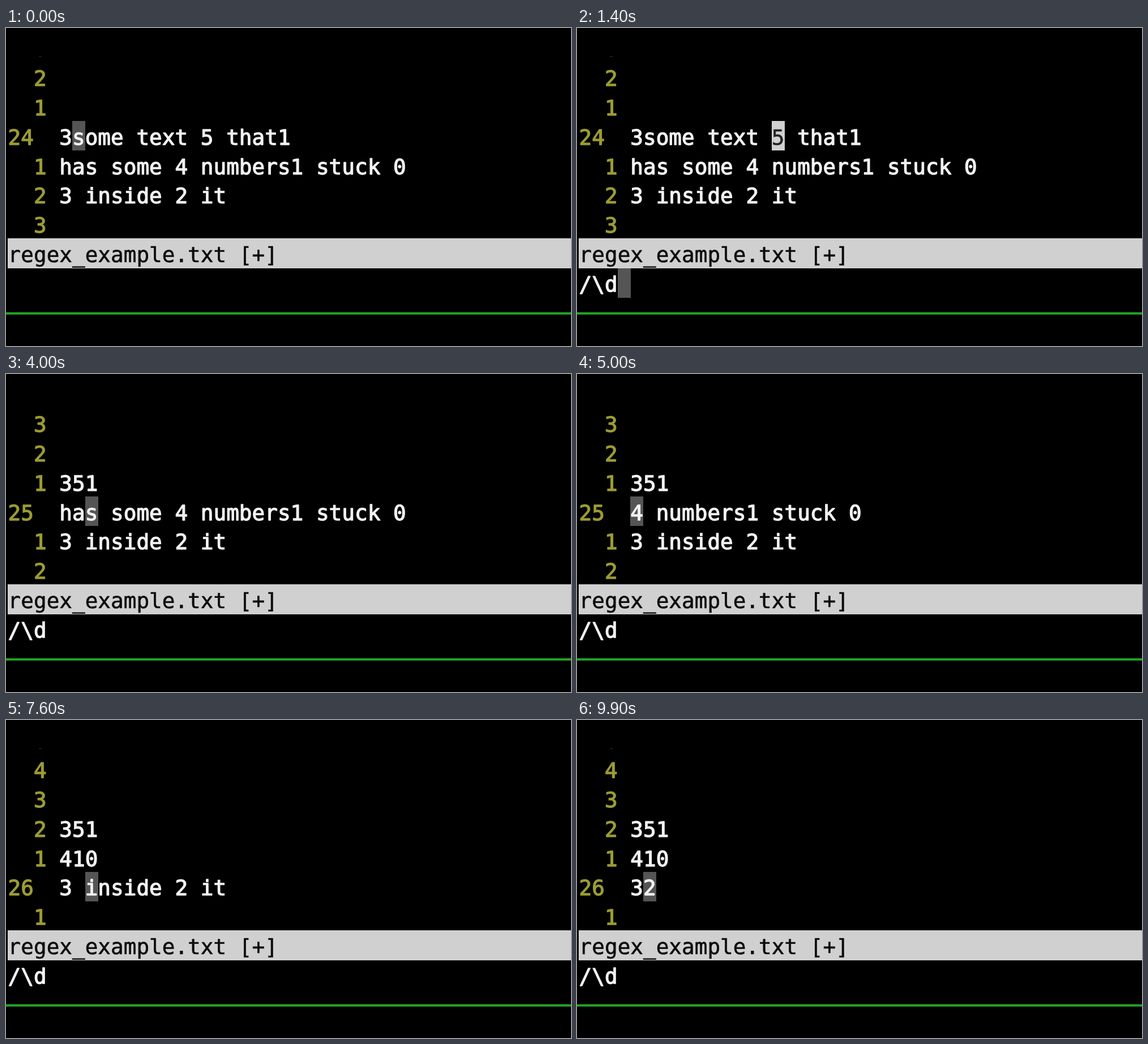
Animation, 998 px wide and 561 px high, one loop 10000 ms. Source, as an HTML page with a canvas:

```html
<!DOCTYPE html>
<html lang="en">
<head>
<meta charset="utf-8">
<title>Deleting up to the next digit</title>
<style>
  html, body { margin: 0; width: 100%; height: 100%; overflow: hidden; background: #000; }
  canvas { display: block; }
</style>
</head>
<body>
<canvas id="screen" width="998" height="561"></canvas>
<script>
const ctx = document.getElementById('screen').getContext('2d');
const LOOP = 10000;
const LEFT = 3.6, TOP = 8.3, CELL = 22.68, ROW = 51.9, BASELINE = 41.6;
const TEXT_COL = 4, TEXT_ROW = 3, STATUS_ROW = 7, COMMAND_ROW = 8;
const WHITE = '#f2f2f2', OLIVE = '#9c9c34', CURSOR = '#555', LIGHT = '#d0d0d0';
const BLACK = '#000';

// Each key press changes only the listed fields of the editor state.
const start = {
  lines: ['3some text 5 that1', 'has some 4 numbers1 stuck 0', '3 inside 2 it'],
  row: 0, col: 1, command: '', typing: false, match: -1
};
const edit = (row, text) => state => ({
  lines: state.lines.map((line, i) => i === row ? text : line)
});
const keys = [
  [700, { command: '/', typing: true }],
  [1000, { command: '/\\' }],
  [1200, { command: '/\\d', match: 11 }],
  [1700, { typing: false, match: -1 }],
  [1700, edit(0, '35 that1')],
  [2400, { col: 2 }],
  [3000, edit(0, '351')],
  [3900, { row: 1 }],
  [4200, { col: 1 }],
  [4400, { col: 0 }],
  [5000, edit(1, '4 numbers1 stuck 0')],
  [5400, { col: 1 }],
  [5800, edit(1, '41 stuck 0')],
  [6300, { col: 2 }],
  [6700, edit(1, '410')],
  [7300, { row: 2 }],
  [7700, { col: 1 }],
  [8200, edit(2, '32 it')],
  [8700, { col: 2 }],
  [9200, edit(2, '32')],
  [9200, { col: 1 }]
];

function stateAt(time) {
  return keys.filter(([at]) => at <= time).reduce((state, [, change]) =>
    ({ ...state, ...(typeof change === 'function' ? change(state) : change) }), start);
}

function rect(x, y, w, h, color) {
  ctx.fillStyle = color;
  ctx.fillRect(x, y, w, h);
}

function block(col, row, color) {
  rect(Math.round(LEFT + col * CELL), Math.round(TOP + row * ROW), 23, 52, color);
}

// A thin outline gives the regular face a semi-bold weight.
function print(text, col, row, color, outline = 1.3) {
  ctx.font = '37.67px "DejaVu Sans Mono", monospace';
  ctx.fillStyle = ctx.strokeStyle = color;
  ctx.lineWidth = outline;
  ctx.lineJoin = 'round';
  [...text].forEach((char, i) => {
    const x = LEFT + (col + i) * CELL, y = TOP + row * ROW + BASELINE;
    ctx.fillText(char, x, y);
    ctx.strokeText(char, x, y);
  });
}

function drawGutter(current) {
  for (let row = 1; row < STATUS_ROW; row++) {
    const distance = row - TEXT_ROW - current;
    if (distance) print(String(Math.abs(distance)), 2, row, OLIVE);
    else print(String(24 + current), 0, row, OLIVE);
  }
  // Clipped bottom of the number above; a 4 leaves nothing visible.
  if (current !== 1) rect(58, 50, 5, 1, '#303030');
}

function draw(time) {
  const { lines, row, col, command, typing, match } = stateAt(time);
  rect(0, 0, 998, 561, BLACK);
  drawGutter(row);

  if (typing) block(command.length, COMMAND_ROW, CURSOR);
  else block(TEXT_COL + col, TEXT_ROW + row, CURSOR);
  lines.forEach((line, i) => print(line, TEXT_COL, TEXT_ROW + i, WHITE));
  if (match >= 0) {
    block(TEXT_COL + match, TEXT_ROW + row, LIGHT);
    print(lines[row][match], TEXT_COL + match, TEXT_ROW + row, '#222', 0.6);
  }

  rect(3, 371, 995, 53, LIGHT);
  print('regex_example.txt [+]', 0, STATUS_ROW, '#0c0c0c', 0.6);
  print(command, 0, COMMAND_ROW, WHITE);
  rect(0, 501, 998, 5, '#125c12');
  rect(0, 502, 998, 3, '#22a522');
}

function frame(now) {
  draw(now % LOOP);
  requestAnimationFrame(frame);
}
requestAnimationFrame(frame);
</script>
</body>
</html>
```
